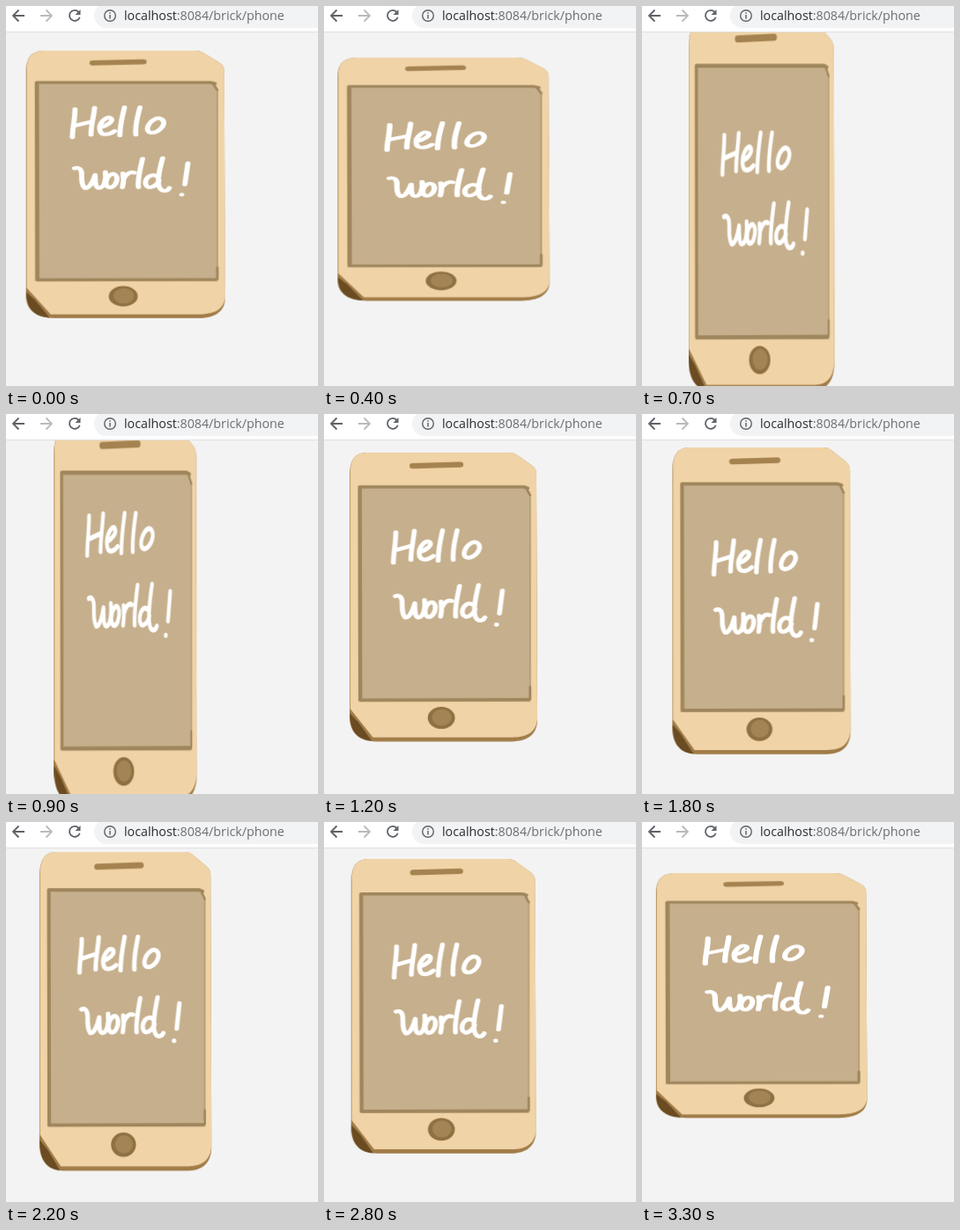
An HTML page for the animation above (3400 ms loop, 354 by 432 pixels).

```html
<!DOCTYPE html>
<html lang="en">
<head>
<meta charset="utf-8">
<title>Bouncing phone</title>
<style>
  html, body { margin: 0; width: 100%; height: 100%; overflow: hidden; background: #f3f3f3; }
  svg { display: block; }

  .phone, .greeting {
    animation: rubber 3s ease infinite paused;
    animation-delay: calc(var(--clock, 375) * -1ms);
  }
  .phone { transform-origin: 135px 137.5px; }
  .greeting {
    animation-name: bounce;
    animation-duration: 1s;
    fill: none;
    stroke: #fff;
    stroke-width: 5;
    stroke-linecap: round;
    stroke-linejoin: round;
  }

  @keyframes rubber {
    0%, 100% { transform: scale(1, 1); }
    31.3% { transform: scale(1.25, .75); }
    41.3% { transform: scale(.75, 1.25); }
    50.5% { transform: scale(1.15, .85); }
    65% { transform: scale(.95, 1.05); }
    75% { transform: scale(1.05, .95); }
  }

  @keyframes bounce {
    0%, 20%, 53%, 80%, 100% {
      transform: translateY(0);
      animation-timing-function: cubic-bezier(.215, .61, .355, 1);
    }
    40%, 43% {
      transform: translateY(-33px);
      animation-timing-function: cubic-bezier(.755, .05, .855, .06);
    }
    70% {
      transform: translateY(-16px);
      animation-timing-function: cubic-bezier(.755, .05, .855, .06);
    }
    90% { transform: translateY(-4px); }
  }

  .icon { fill: none; stroke: #5f6368; stroke-width: 1.8; }
  .url { font: 14.25px "Open Sans", "Noto Sans", sans-serif; fill: #6a6e72; }
  .host { fill: #2b2c2f; }
</style>
</head>
<body>
<svg id="stage" width="354" height="432" viewBox="0 0 354 432">
  <rect width="354" height="432" fill="#f3f3f3"/>

  <g class="phone">
    <!-- case: shaded base, lit face, dark corner -->
    <path fill="#a17c48" d="M39 64C39 42 44 33 58 33H203Q208 33 212 37L227 50Q231 54 231 60L232 374C231 391 222 399 206 399.500H66C48 398 39 388 39 368Z"/>
    <path fill="#f0d3a6" d="M39.600 62C39.600 42 44 33 58 33H203Q208 33 212 37L227 50Q231 54 231 60L232 372C230 388 222 394 206 394.300H63L39.600 358Z"/>
    <path fill="#6b4c22" d="M39.300 364L48 375 62 399C48 398 39 388 39.300 364Z"/>

    <!-- screen -->
    <path fill="#c6af8c" d="M48 76H220L225 87V349H48Z"/>
    <path fill="none" stroke="#b59c73" stroke-width="1.500" d="M224.500 88V334"/>
    <path fill="none" stroke="#9f865c" stroke-width="4" stroke-linecap="round" stroke-linejoin="round" d="M222 78L218 76.500 49.500 76.500 50 347 223 346.500"/>
    <path fill="none" stroke="#9f865c" stroke-width="2.500" stroke-linecap="round" d="M221 79L224.500 87M224.500 330V346"/>

    <!-- speaker and button -->
    <path fill="none" stroke="#a58350" stroke-width="7" stroke-linecap="round" d="M104 49.800L152.500 48.200"/>
    <ellipse cx="133.300" cy="369.500" rx="14" ry="14" fill="#8f7043"/>
    <ellipse cx="133.800" cy="369" rx="10" ry="10.500" fill="#a38455"/>

    <g class="greeting">
      <!-- Hello -->
      <path d="M86.500 146C86.500 160 84 172 84 184.500M105.500 144C104.500 158 102 168 102 181M85 169L103 163"/>
      <path d="M111 171C117 169 124 163 121.500 158.500C118 154 110 164 110.500 173C111 184 120 181 125 176"/>
      <path d="M134.500 143.500C132 157 130 170 130 182M149.500 143.500C147 157 144.500 168 145.500 181"/>
      <path d="M165 159C158 163 155 173 158 177C163 181 171 174 172.500 166C173 160 169 157 165 159Z"/>
      <!-- world ! -->
      <path d="M86 227C90 225 93 228 93 235C93 244 93 250 96 254C100 255 104 246 106 236C106 246 106 254 110 254C115 253 117 243 116 232"/>
      <path d="M122 235C116 239 115 250 119 253C124 255 128 246 127 239C126 235 124 234 122 235Z"/>
      <path d="M133 234C134 241 133.500 248 132.500 253M133.500 242C136 235 140 231 144 233"/>
      <path d="M152 214C149.500 228 147 242 148 253"/>
      <path d="M166 238C160 233 154 241 155 249C157 257 165 252 168 244M171.500 213C168.500 228 166 244 168 252C170 260 176 259 178 254"/>
      <path d="M196 220L193 249M190 263V263.100"/>
    </g>
  </g>

  <!-- browser bar -->
  <rect width="354" height="29" fill="#fff"/>
  <rect y="29" width="354" height="1" fill="#dedfe1"/>
  <rect x="100" y="-3" width="300" height="28" rx="14" fill="#f1f3f4"/>
  <path class="icon" d="M21 11H8.500M14.500 4.500L8 11 14.500 17.500"/>
  <path class="icon" style="stroke:#b8babd" d="M39 11H51.500M45.500 4.500L52 11 45.500 17.500"/>
  <path class="icon" d="M82.500 6.800A6 6 0 1 0 83.700 12.700"/>
  <path fill="#5f6368" d="M84.500 4V10H78.500Z"/>
  <circle class="icon" style="stroke-width:1.400" cx="118" cy="11" r="6.300"/>
  <path class="icon" style="stroke-width:1.500" d="M118 10V14.500M118 7.300V8.800"/>
  <text class="url" x="134" y="16"><tspan class="host">localhost</tspan>:8084/brick/phone</text>
</svg>

<script>
  const LOOP = 3400, STEP = 100, PHASE = 375, RATE = 1.012;
  const stage = document.getElementById('stage');
  const start = performance.now();

  // Both animations share one clock that ticks ten times a second.
  function tick() {
    const time = (performance.now() - start) % LOOP;
    const held = Math.floor(time / STEP) * STEP;
    stage.style.setProperty('--clock', PHASE + held * RATE);
    requestAnimationFrame(tick);
  }
  tick();
</script>
</body>
</html>
```
